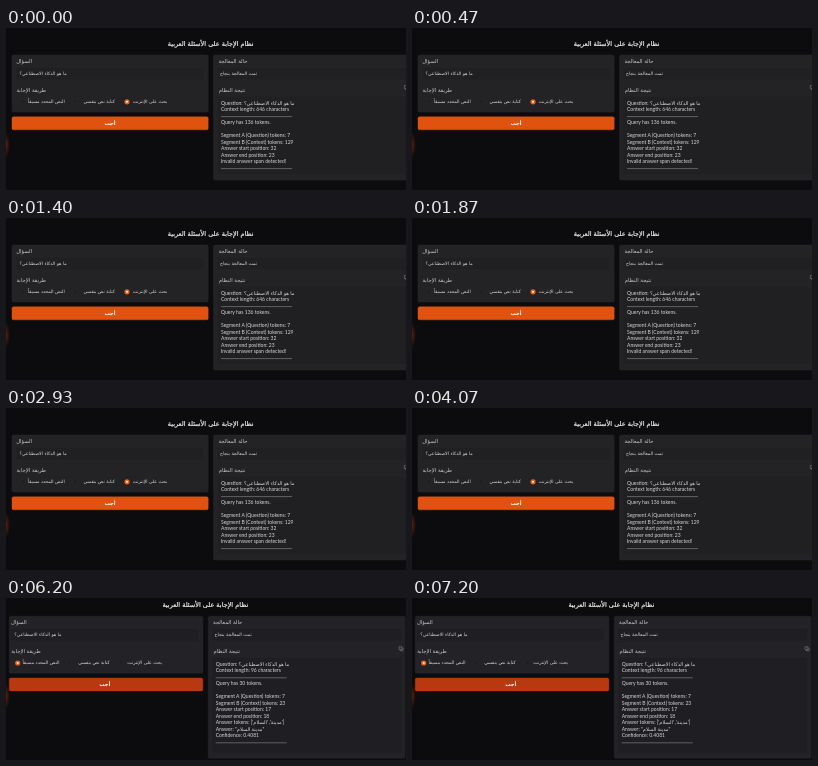
An HTML page for the animation above (8000 ms loop, 400x162 px).

```html
<!DOCTYPE html>
<html lang="ar">
<head>
<meta charset="utf-8">
<style>
html, body { margin: 0; width: 100%; height: 100%; overflow: hidden; background: #0c0b0d; }
svg { display: block; width: 100vw; height: 100vh; direction: ltr; }
text { font: 4.6px "DejaVu Sans", sans-serif; fill: #d8d8da; text-anchor: middle; }
.label { font-size: 5.3px; fill: #c8c8cc; }
.title { font-size: 6.5px; fill: #f0f0f0; stroke: #f0f0f0; stroke-width: .2; }
.button { font-size: 5.2px; font-weight: bold; fill: #fff; }
.log { font: 5.02px Lato, "DejaVu Sans", sans-serif; text-anchor: start; }
</style>
</head>
<body>
<svg id="stage" viewBox="0 0 400 162">
  <defs>
    <radialGradient id="ember">
      <stop offset="0" stop-color="#5a200c"/>
      <stop offset="1" stop-color="#5a200c" stop-opacity="0"/>
    </radialGradient>
  </defs>
</svg>
<script>
const LOOP = 8000, SWITCH = 4130, LINE = 6.5;
const RIGHT = 202.2;
const stage = document.getElementById('stage');

const text = (s, x, y, cls = '') => `<text class="${cls}" x="${x}" y="${y}">${s}</text>`;
const box = (x, y, w, h, fill, stroke = 'none') =>
  `<rect x="${x}" y="${y}" width="${w}" height="${h}" rx="1.5" fill="${fill}" stroke="${stroke}" stroke-width=".4"/>`;

const options = [
  ['النص المحدد مسبقاً', 17, 40.3],
  ['كتابة نص بنفسي', 69, 93.2],
  ['بحث على الإنترنت', 121, 144]
];

function radio([name, x, mid], on) {
  const dot = on
    ? `<circle cx="${x}" cy="73.8" r="2.6" fill="#e8601c"/><circle cx="${x}" cy="73.8" r="1" fill="#fff"/>`
    : `<circle cx="${x}" cy="73.8" r="2" fill="#1e1d20" stroke="#323136" stroke-width=".4"/>`;
  return dot + text(name, mid, 75.2);
}

// '-' draws a rule, an empty string leaves a blank line
function log(lines) {
  return lines.map((s, i) => {
    const y = 76.6 + i * LINE;
    return s === '-'
      ? `<path d="M215 ${y - 1}h71" stroke="#a0a0a2" stroke-width=".5"/>`
      : text(s, 215, y, 'log');
  }).join('');
}

const copyIcon = '<path d="M398.3 57.6h2.8v2.8h-2.8zM399.6 60.4v1.2h2.8v-2.8h-1.3" ' +
  'fill="none" stroke="#8c8c90" stroke-width=".5"/>';

function scene(o) {
  const g = document.createElementNS('http://www.w3.org/2000/svg', 'g');
  const width = RIGHT - o.left;
  g.innerHTML =
    `<ellipse cx="0" cy="${o.ember}" rx="4" ry="13" fill="url(#ember)"/>` +
    `<g transform="translate(${o.dx} ${o.dy})">` +
    text('نظام الإجابة على الأسئلة العربية', 204.7, 17.7, 'title') +
    box(o.left, 27, width, 57, o.panel, '#2c2b2f') +
    box(10, 39, 188, 13, o.field, '#2a292d') +
    text('السؤال', 18.2, 34.8, 'label') +
    text('ما هو الذكاء الاصطناعي؟', 37.2, 47) +
    text('طريقة الإجابة', 25.3, 63.6, 'label') +
    options.map((r, i) => radio(r, i === o.selected)).join('') +
    box(o.left, 88.8, width, 13, o.button, o.edge) +
    text('أجب', 104, 97, 'button') +
    box(207.5, 27, o.wide, o.height, o.panel, '#2c2b2f') +
    box(211, 39, o.wide - 7, 13, o.field, '#2a292d') +
    box(211, 68, o.wide - 7, o.height - 46, o.field, '#2a292d') +
    text('حالة المعالجة', 227, 34.8, 'label') +
    text('تمت المعالجة بنجاح', 232.5, 47) +
    text('نتيجة النظام', 226, 63.6, 'label') +
    log(o.lines) + copyIcon + '</g>';
  stage.append(g);
  return g;
}

const question = 'Question: ما هو الذكاء الاصطناعي؟';

const search = scene({
  dx: 0, dy: 0, left: 6, selected: 2, wide: 196, height: 125, ember: 117,
  panel: '#232225', field: '#201f22', button: '#df5210', edge: '#e2571a',
  lines: [question, 'Context length: 646 characters', '-', 'Query has 136 tokens.', '',
    'Segment A (Question) tokens: 7', 'Segment B (Context) tokens: 129',
    'Answer start position: 32', 'Answer end position: 23',
    'Invalid answer span detected!', '-']
});

const preset = scene({
  dx: -5.3, dy: -8.8, left: 8.5, selected: 0, wide: 197, height: 142, ember: 98,
  panel: '#232226', field: '#1f1e22', button: '#b8380f', edge: '#b83c14',
  lines: [question, 'Context length: 96 characters', '-', 'Query has 30 tokens.', '',
    'Segment A (Question) tokens: 7', 'Segment B (Context) tokens: 23',
    'Answer start position: 17', 'Answer end position: 18',
    "Answer tokens: ['مدينة', 'السلام']", 'Answer: "مدينة السلام"', 'Confidence: 0.4081', '-']
});

function draw(now) {
  const first = now % LOOP < SWITCH;
  search.style.display = first ? '' : 'none';
  preset.style.display = first ? 'none' : '';
  requestAnimationFrame(draw);
}
draw(0);
</script>
</body>
</html>
```
